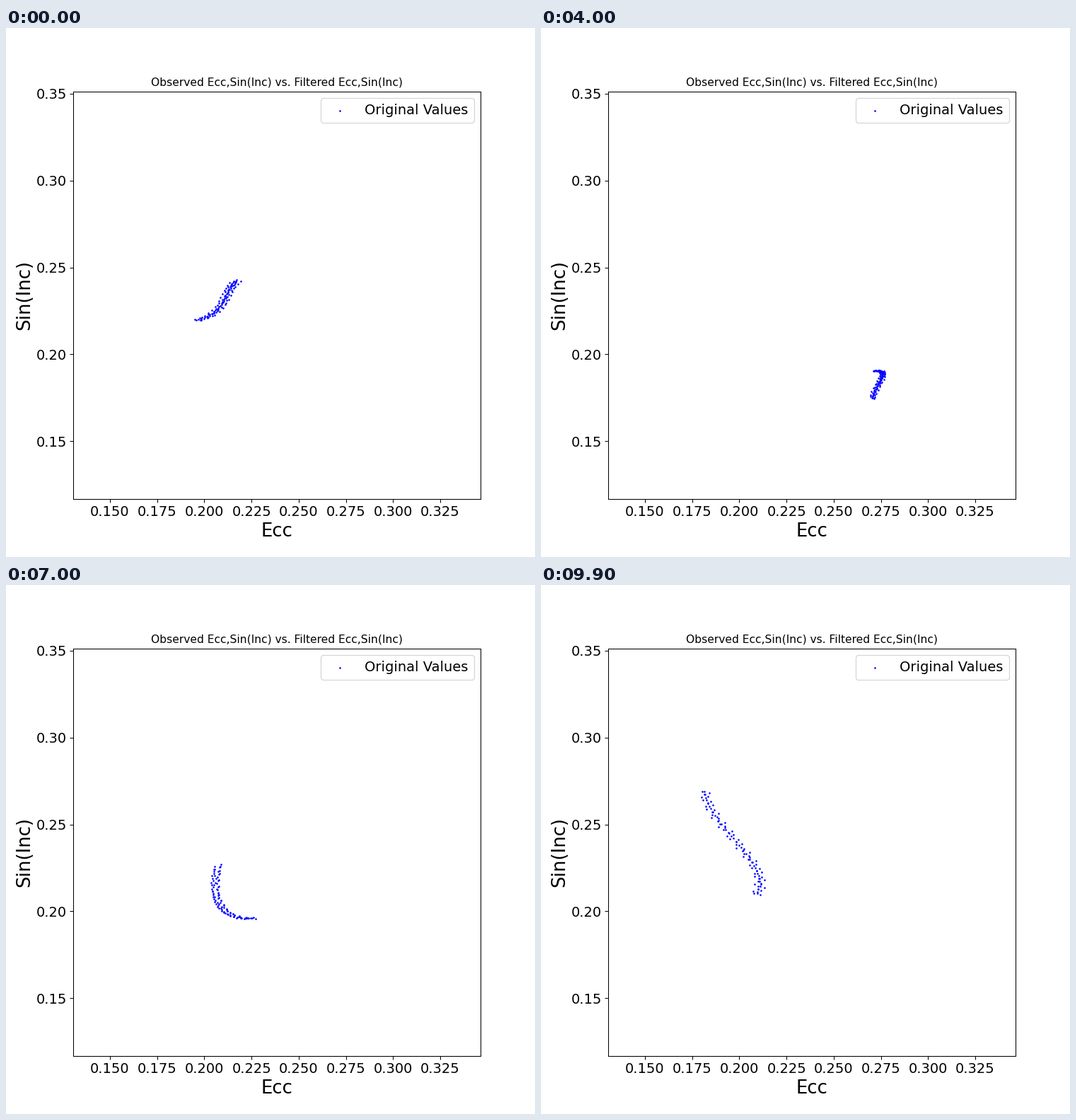
Write a matplotlib script that moves like this. It is 748x748 px and loops after 10 s.

```python
import numpy as np
import matplotlib.pyplot as plt
from matplotlib.animation import FuncAnimation

FRAMES, STEP_MS, DOTS = 100, 100, 100
XLIM, YLIM = (0.13065, 0.34647), (0.1168, 0.3513)

# Key arcs: frame -> Bezier start, two handles, end, in stage pixels.
ARCS = {
    0: [(269, 413), (313, 404), (307, 371), (326, 357)],
    22: [(377, 482), (412, 482), (407, 420), (391, 411)],
    40: [(471, 485), (497, 482), (473, 502), (468, 524)],
    51: [(360, 340), (358, 376), (401, 435), (402, 467)],
    70: [(300, 396), (288, 437), (298, 474), (350, 471)],
    80: [(245, 299), (290, 310), (346, 341), (304, 363)],
    99: [(231, 291), (235, 340), (333, 398), (304, 438)],
}
KEYS = list(ARCS)
SHAPES = np.array(list(ARCS.values()), float)
U = np.linspace(0, 1, DOTS)


def bezier(p, u):
    a, b, c, d = p
    u = u[:, None]
    v = 1 - u
    return v**3 * a + 3 * v**2 * u * b + 3 * v * u**2 * c + u**3 * d


def swing(s, phase):
    """Two beating secular terms in -1..1."""
    return (0.66 * np.sin(2 * np.pi * s / 4.3 + phase)
            + 0.34 * np.sin(2 * np.pi * s / 2.7 + 1.7 * phase))


def trail(frame):
    # drift from one key arc to the next, swinging freely in between
    i = min(np.searchsorted(KEYS, frame, side="right"), len(KEYS) - 1) - 1
    f = (frame - KEYS[i]) / (KEYS[i + 1] - KEYS[i])
    p = bezier((1 - f) * SHAPES[i] + f * SHAPES[i + 1], U)
    calm = np.exp(-((frame - 39) / 10) ** 2)
    free = np.sqrt(abs(np.sin(np.pi * f)))
    p[:, 0] += free * (65 - 45 * calm) * swing(frame + U, 0.4)
    p[:, 1] += free * 60 * swing(frame + U, 0.9)

    # short-period ripple, mostly along the eccentricity axis
    n = frame * DOTS + np.arange(DOTS)
    size = 1 - 0.4 * calm
    p[:, 0] += size * (4.8 * np.cos(2.33 * n) + 2.2 * np.cos(0.71 * n))
    p[:, 1] += size * 0.7 * np.sin(2.33 * n)
    return to_data(p)


def to_data(p):
    ecc = 0.150 + (p[:, 0] - 147) / 2668.6
    inc = 0.350 - (p[:, 1] - 93) / 2456
    return np.column_stack([ecc, inc])


fig, ax = plt.subplots(figsize=(8, 8), dpi=93.5)
ax.set_box_aspect(1)
ax.set(xlim=XLIM, ylim=YLIM)
ax.set_xticks(np.arange(0.150, 0.326, 0.025))
ax.set_yticks(np.arange(0.15, 0.351, 0.05))
ax.tick_params(labelsize=15)
ax.set_title("Observed Ecc,Sin(Inc) vs. Filtered Ecc,Sin(Inc)", fontsize=11.9)
ax.set_xlabel("Ecc", fontsize=20)
ax.set_ylabel("Sin(Inc)", fontsize=20, labelpad=3)

dots = ax.scatter(*trail(0).T, s=1, c="blue", linewidths=1, label="Original Values")
ax.legend(loc="upper right", fontsize=15)


def draw(frame):
    dots.set_offsets(trail(frame))
    return dots,


anim = FuncAnimation(fig, draw, frames=FRAMES, interval=STEP_MS,
                     repeat=True, repeat_delay=0)
plt.show()
```
